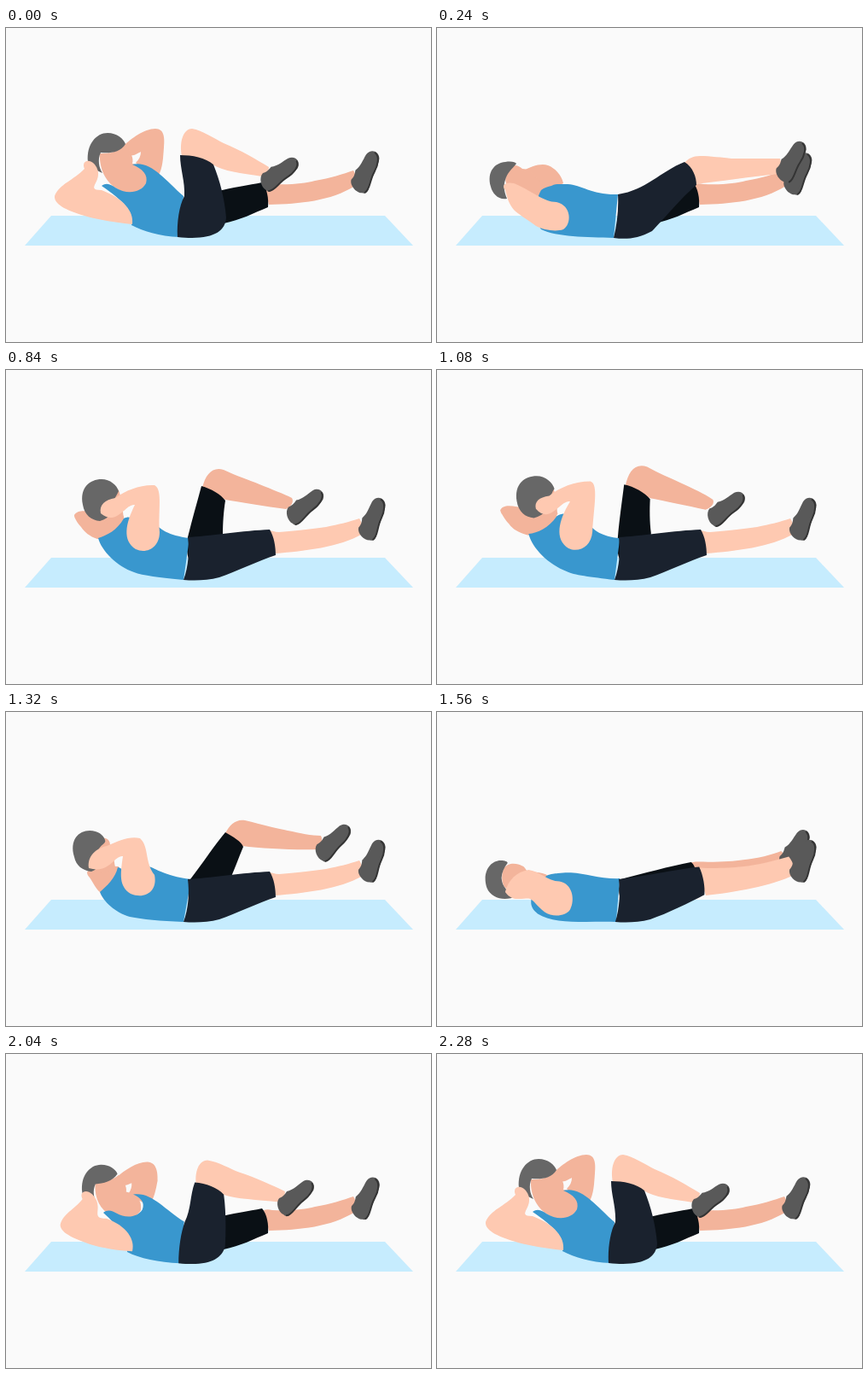
Write an HTML page that moves like this. It is 498 px wide and 368 px high and loops after 2.4 s.

```html
<!DOCTYPE html>
<html lang="en">
<head>
<meta charset="utf-8">
<title>Bicycle crunch</title>
<style>
html, body { margin: 0; width: 100%; height: 100%; overflow: hidden; background: #fafafa; }
svg { display: block; width: 100vw; height: 100vh; }
</style>
</head>
<body>
<svg id="stage" viewBox="0 0 498 368">
  <path d="M53,220H444L477,255H22Z" fill="#c6ecfe"/>
</svg>
<script>
const SKIN = '#fec9b1', SHADE = '#f3b49b', SHOE = '#595959', SOLE = '#343434';
const SHOE_SHAPE = 'M-25,6C-28,0 -23,-11 -16,-12C-11,-10 -8,-11 -4,-12C3,-8 10,-9 18,-8C27,-6 28,4 20,8C10,11 -5,8 -18,11C-23,11 -25,9 -25,6Z';
const SHOE_SOLE = 'M-23,9C-18,13 -8,8 3,9C13,10 23,7 24,1';

// Poses: near knee up, near leg lowering, flat, far knee low, far knee high.
// The second flat pose (flat2) is used on the way back.
const ORDER = ['knee', 'lower', 'flat', 'farLow', 'farHigh'];
const STEP = 120;
const STEPS = [0, .5, 1, 1.6, 1.95, 2, 2.7, 4, 4.25, 4.35,
  4.3, 3, 2.45, 2.1, 2, 2, 1.3, .2, .05, 0];

// Parts are listed from back to front.
const PARTS = [
  { fill: SHADE, poses: {
    knee: 'M302,183C305,182 308,182 312,183C335,184 350,182 362,179C380,176 395,171 407,167C411,173 411,180 409,185C380,203 345,206 308,207Z',
    flat: 'M300,177C303,177 306,177 310,177C335,177 350,175 362,173C380,171 395,167 405,163C411,167 412,173 412,180C380,195 345,200 306,200Z',
    flat2: 'M300,181C303,181 306,181 310,181C335,181 350,179 362,177C380,175 395,170 407,165C411,168 412,173 412,180C380,195 345,200 306,200Z',
    farLow: 'M257,142C262,132 270,125 280,127C300,132 320,137 330,139C345,142 358,145 369,145C372,151 369,158 366,161C340,162 300,160 277,157Z',
    farHigh: 'M230,138C234,122 242,113 255,117C270,124 285,129 297,134C312,140 325,145 335,150C338,155 333,161 328,163C305,160 275,155 257,152Z' } },
  { shoe: true, poses: {
    knee: [422, 168, -66], lower: [424, 170, -66], flat: [424, 162, -62],
    farLow: [384, 152, -46], farHigh: [351, 159, -41] } },
  { fill: '#0a1015', poses: {
    knee: 'M245,192C265,187 285,184 300,181C306,188 308,200 307,210C290,217 275,225 255,229C245,235 235,240 225,240C222,225 228,200 245,192Z',
    flat: 'M215,196C245,190 275,181 300,176C304,181 305,184 306,190C290,205 270,220 255,229C245,235 235,240 225,240C215,225 210,210 215,196Z',
    flat2: 'M215,196C245,190 275,184 302,180C304,181 305,184 306,190C290,205 270,220 255,229C245,235 235,240 225,240C215,225 210,210 215,196Z',
    farLow: 'M216,196C230,178 245,155 257,141C266,146 276,152 278,158C272,172 268,184 263,195C250,215 235,230 225,240C212,225 212,210 216,196Z',
    farHigh: 'M213,196C218,175 224,155 229,136C240,139 252,146 257,153C255,165 254,180 254,192C250,215 235,230 225,240C212,225 210,210 213,196Z' } },
  { fill: SHADE, poses: {
    knee: 'M138,138C146,130 162,118 175,118C186,118 186,130 185,140C184,152 184,164 178,174C170,172 160,166 152,158C156,154 158,150 158,145C152,148 142,156 138,138Z',
    lower: 'M100,168C110,162 122,158 130,161C138,164 146,172 148,182C142,186 134,186 128,188C122,186 116,184 112,182C108,180 106,178 104,176C102,174 100,171 100,168Z',
    flat: 'M100,190C108,187 120,188 126,191C130,192 132,194 133,196C130,200 126,200 122,200C118,200 114,200 110,198C108,198 104,196 102,195C101,194 100,192 100,190Z',
    farLow: 'M97,186C104,180 118,180 132,181C134,186 130,196 124,204C120,208 114,211 110,211C106,208 102,200 98,194C96,192 95,190 95,188C95,187 96,187 97,186Z',
    farHigh: 'M80,170C86,160 105,168 138,172C140,182 132,192 124,196C118,198 112,198 107,198C98,195 92,190 88,184C84,180 82,176 81,174C80,172 80,171 80,170Z' } },
  { fill: SHADE, poses: {
    knee: 'M110,147C125,148 136,142 140,136C146,146 150,152 148,159C158,160 168,166 165,180C160,194 142,197 128,187C114,178 109,160 110,147Z',
    lower: 'M84,165C90,158 96,162 100,165C106,165 110,168 112,172C120,178 128,186 130,195C115,200 95,195 84,186C78,180 80,172 84,165Z',
    flat: 'M74,188C80,178 92,181 97,183C101,184 101,186 104,188C112,192 116,198 115,208C105,216 85,216 76,210C72,204 72,195 74,188Z',
    farLow: 'M110,148C118,146 122,150 122,156C126,162 126,172 128,182C118,190 108,190 102,186C100,180 104,170 106,162C106,156 108,152 110,148Z',
    farHigh: 'M126,140C131,136 133,142 134,148C138,156 136,166 138,172C128,184 114,182 108,172C108,165 118,160 122,152C124,148 125,144 126,140Z' } },
  { fill: '#676767', poses: {
    knee: 'M96,157C94,136 106,123 119,123C130,123 138,130 140,136C134,146 122,147 111,146C107,154 109,164 113,170C106,167 98,163 96,157Z',
    lower: 'M63,186C58,168 68,158 80,157C87,156 92,157 93,159C88,165 82,170 80,178C78,184 78,190 82,200C72,202 65,194 63,186Z',
    flat: 'M56,210C50,192 60,178 72,178C77,178 79,179 79,180C74,186 72,192 72,198C72,208 80,214 92,219C80,226 62,224 56,210Z',
    farLow: 'M80,170C74,150 85,139 98,139C108,139 114,144 116,150C118,154 110,156 108,162C112,172 110,184 100,187C90,186 82,180 80,170Z',
    farHigh: 'M90,158C86,138 98,128 112,128C122,128 130,135 132,142C130,146 128,150 126,152C128,164 122,174 110,177C100,176 92,170 90,158Z' } },
  { fill: '#3997ce', poses: {
    knee: 'M112,185C118,180 124,184 128,187C142,196 158,193 164,182C167,172 160,165 148,160C170,155 186,178 208,197L203,245C180,244 160,238 147,231C150,215 138,203 112,185Z',
    lower: 'M122,190C126,187 130,186 134,185C138,183 140,183 143,183C147,183 150,183 153,183C170,184 182,196 212,195L207,246C175,245 140,245 122,236C112,222 114,205 122,190Z',
    flat: 'M112,215C116,205 122,197 128,193C134,190 138,190 142,189C147,188 151,188 156,189C175,190 190,196 214,195L210,246C175,245 135,250 115,236C108,230 108,224 112,215Z',
    farLow: 'M110,211C118,204 128,195 131,182C134,182 136,184 137,188C150,190 160,188 165,181C172,180 182,192 217,196L208,246C180,245 160,243 145,240C128,235 114,222 110,211Z',
    farHigh: 'M108,197C118,194 130,188 138,174C142,172 145,172 148,174C155,178 165,182 175,180C180,186 190,194 215,197L208,246C180,243 160,241 150,237C130,230 112,212 108,197Z' } },
  { fill: SKIN, poses: {
    knee: 'M206,150C203,135 207,118 218,118C230,120 245,130 255,135C275,143 295,155 308,163C308,168 304,173 300,174C275,170 255,168 242,160Z',
    lower: 'M290,158C294,153 300,150 308,150C320,150 335,152 345,153C365,153 385,153 402,153C404,160 404,168 400,171C370,174 330,180 302,183Z',
    flat: 'M304,188C306,186 308,185 310,187C325,188 345,188 355,186C375,184 395,180 413,175C418,180 420,186 418,191C395,203 345,212 315,215Z',
    flat2: 'M304,184C306,182 308,181 310,182C325,183 345,182 355,181C375,179 395,174 412,169C418,176 420,186 418,191C395,203 345,212 315,215Z',
    farLow: 'M308,188C311,188 315,190 320,190C345,188 360,186 375,184C390,181 402,178 414,174C418,180 419,186 418,192C390,208 350,212 316,215Z' } },
  { shoe: true, poses: {
    knee: [321, 170, -37], lower: [416, 156, -61], flat: [430, 174, -69] } },
  { fill: '#1a222e', poses: {
    knee: 'M209,197C210,180 204,165 204,149C218,149 234,152 243,160C251,180 256,200 258,222C257,240 240,249 201,245C200,228 203,208 209,197Z',
    lower: 'M212,195C245,190 262,168 290,157C300,163 304,175 304,184C285,200 265,225 252,238C235,247 222,248 207,246C211,230 213,212 212,195Z',
    flat: 'M213,196C235,194 280,186 305,185C312,194 315,205 315,215C295,224 270,236 250,243C235,247 220,247 209,246C214,230 215,212 213,196Z',
    flat2: 'M213,196C235,194 280,184 307,181C312,192 314,205 313,214C295,224 270,236 250,243C235,247 220,247 209,246C214,230 215,212 213,196Z',
    farLow: 'M213,196C235,195 280,188 309,187C314,195 316,207 316,217C295,224 270,236 250,243C235,247 220,247 208,246C214,230 215,212 213,196Z' } },
  { fill: SKIN, poses: {
    knee: 'M92,165C88,156 97,152 104,160C118,178 90,190 112,190C138,200 150,215 148,230C128,228 110,225 95,221C75,215 56,208 57,197C62,183 80,178 92,165Z',
    lower: 'M80,190C75,184 80,180 90,182C110,190 125,204 140,204C158,208 158,230 148,236C140,239 125,237 116,232C105,224 95,218 90,213C84,206 82,198 80,190Z',
    flat: 'M78,214C82,200 92,190 106,188C118,190 128,204 142,204C158,206 162,225 154,236C148,243 132,243 124,237C115,230 110,222 104,224C96,224 84,226 78,214Z',
    farLow: 'M97,183C95,168 106,160 118,157C132,151 145,145 157,148C168,158 162,175 174,191C178,210 163,220 146,213C132,204 134,190 137,169C126,168 122,190 97,183Z',
    farHigh: 'M111,168C109,158 116,152 128,150C140,141 158,134 174,135C184,140 178,165 180,190C180,208 165,216 152,210C136,200 140,180 151,158C140,156 130,184 111,168Z' } }
];

const stage = document.getElementById('stage');

function add(tag, attrs, parent = stage) {
  const el = document.createElementNS('http://www.w3.org/2000/svg', tag);
  for (const key in attrs) el.setAttribute(key, attrs[key]);
  return parent.appendChild(el);
}

for (const part of PARTS) {
  if (part.shoe) {
    part.el = add('g', {});
    add('path', { d: SHOE_SHAPE, fill: SHOE }, part.el);
    add('path', { d: SHOE_SOLE, fill: 'none', stroke: SOLE, 'stroke-width': 2, 'stroke-linecap': 'round' }, part.el);
  } else {
    part.el = add('path', { fill: part.fill });
  }
}

// A part without its own pose keeps the previous one.
function poseOf(part, index, returning) {
  if (index === 2 && returning && part.poses.flat2) return part.poses.flat2;
  while (!part.poses[ORDER[index]]) index--;
  return part.poses[ORDER[index]];
}

const mix = (a, b, k) => a + (b - a) * k;

function mixPath(a, b, k) {
  const ends = b.match(/-?\d+/g);
  let i = 0;
  return a.replace(/-?\d+/g, n => mix(+n, +ends[i++], k).toFixed(1));
}

function draw(step) {
  const pos = STEPS[step], from = Math.min(Math.floor(pos), ORDER.length - 2);
  const k = pos - from, returning = step >= 10;
  for (const part of PARTS) {
    const a = poseOf(part, from, returning), b = poseOf(part, from + 1, returning);
    if (part.shoe) {
      const [x, y, angle] = a.map((v, i) => mix(v, b[i], k));
      part.el.setAttribute('transform', `translate(${x} ${y}) rotate(${angle})`);
    } else {
      part.el.setAttribute('d', mixPath(a, b, k));
    }
  }
}

const start = performance.now();
function tick() {
  const time = performance.now() - start;
  draw(Math.floor(time / STEP) % STEPS.length);
  requestAnimationFrame(tick);
}
tick();
</script>
</body>
</html>
```
